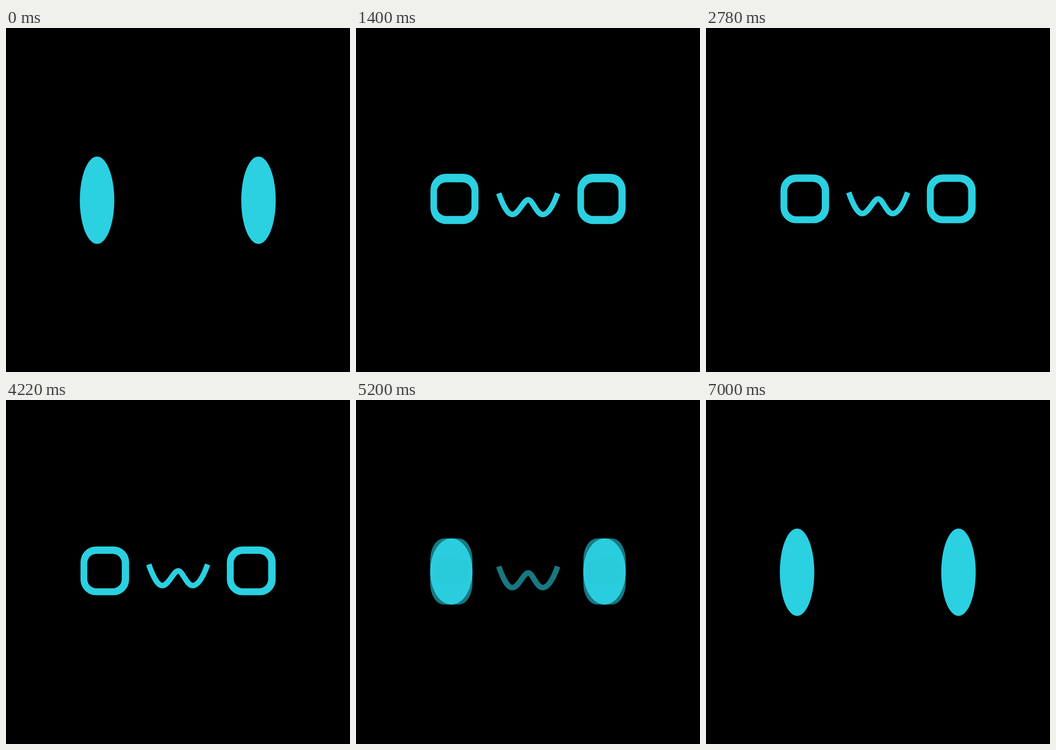
Animation, 748 px wide and 748 px high, one loop 7020 ms. Source, as an HTML page with a canvas:

```html
<!DOCTYPE html>
<html lang="en">
<head>
<meta charset="utf-8">
<title>OwO</title>
<style>
  html, body { margin: 0; width: 100%; height: 100%; overflow: hidden; background: #000; }
  canvas { display: block; width: 748px; height: 748px; }
</style>
</head>
<body>
<canvas id="stage" width="748" height="748"></canvas>
<script>
const ctx = document.getElementById('stage').getContext('2d');
const COLOR = '#2bd0e1';
const LOOP = 7020;
const MORPH = 1000;
const OPEN_AT = 520;
const CLOSE_AT = 4760;

// Eye boxes: left, top, right, bottom
const EYES = [
  { ring: [162, 318.5, 267.7, 424.5], oval: [160.5, 279.5, 235.5, 469.5] },
  { ring: [480.2, 318.5, 586.3, 424.5], oval: [511.5, 279.5, 586.5, 469.5] }
];
const RING_RADIUS = 34 / 106;
const HOLE = 75;
const HOLE_RADIUS = 20;

const clamp = x => Math.min(1, Math.max(0, x));
const smooth = x => { x = clamp(x); return x * x * (3 - 2 * x); };

// Cross-fade: the new shape is solid by half way, the old one fades throughout
const fadeIn = progress => smooth(2 * progress);
const fadeOut = progress => smooth(1 - progress);

// Playback cadence: three poses per 140 ms, held 20, 100 and 20 ms
function poseTime(ms) {
  const rest = ms % 140;
  const index = 3 * Math.floor(ms / 140) + (rest >= 120 ? 2 : rest >= 20 ? 1 : 0);
  return index * 140 / 3;
}

function drawRing(cx, cy, w, h, ovalness) {
  const holeHeight = HOLE - 40 * ovalness;
  ctx.beginPath();
  ctx.roundRect(cx - w / 2, cy - h / 2, w, h, [{ x: w * RING_RADIUS, y: h * RING_RADIUS }]);
  ctx.roundRect(cx - 0.6 - HOLE / 2, cy + 0.5 - holeHeight / 2, HOLE, holeHeight, HOLE_RADIUS);
  ctx.fill('evenodd');
}

function drawOval(cx, cy, w, h) {
  ctx.beginPath();
  ctx.ellipse(cx, cy, w / 2, h / 2, 0, 0, Math.PI * 2);
  ctx.fill();
}

function drawEye({ ring, oval }, ovalness, ringAlpha, ovalAlpha) {
  const [left, top, right, bottom] = ring.map((v, i) => v + (oval[i] - v) * ovalness);
  const box = [(left + right) / 2, (top + bottom) / 2, right - left, bottom - top];
  ctx.globalAlpha = ringAlpha;
  drawRing(...box, ovalness);
  ctx.globalAlpha = ovalAlpha;
  drawOval(...box);
}

function drawMouth(ovalness, alpha) {
  ctx.save();
  ctx.globalAlpha = alpha;
  ctx.translate(374.4, 6 * Math.pow(ovalness, 0.35));
  ctx.lineWidth = 12;
  ctx.beginPath();
  ctx.moveTo(-64, 357.5);
  ctx.bezierCurveTo(-55, 383, -45, 403.5, -34.5, 403.5);
  ctx.bezierCurveTo(-21, 403.5, -10, 371.5, 0, 371.5);
  ctx.bezierCurveTo(10, 371.5, 18, 403.5, 31.5, 403.5);
  ctx.bezierCurveTo(44, 403.5, 55, 383, 64, 357.5);
  ctx.stroke();
  ctx.restore();
}

function draw(now) {
  const t = poseTime(now % LOOP);
  const opening = smooth((t - OPEN_AT) / MORPH);
  const closing = smooth((t - CLOSE_AT) / MORPH);
  const ovalness = 1 - opening + closing;
  const ringAlpha = fadeIn(opening) * fadeOut(closing);
  const ovalAlpha = t < CLOSE_AT ? fadeOut(opening) : fadeIn(closing);

  ctx.globalAlpha = 1;
  ctx.fillStyle = '#000';
  ctx.fillRect(0, 0, 748, 748);
  ctx.fillStyle = ctx.strokeStyle = COLOR;
  EYES.forEach(eye => drawEye(eye, ovalness, ringAlpha, ovalAlpha));
  drawMouth(ovalness, ringAlpha);
}

const start = performance.now();
function tick() {
  draw(performance.now() - start);
  requestAnimationFrame(tick);
}
tick();
</script>
</body>
</html>
```
